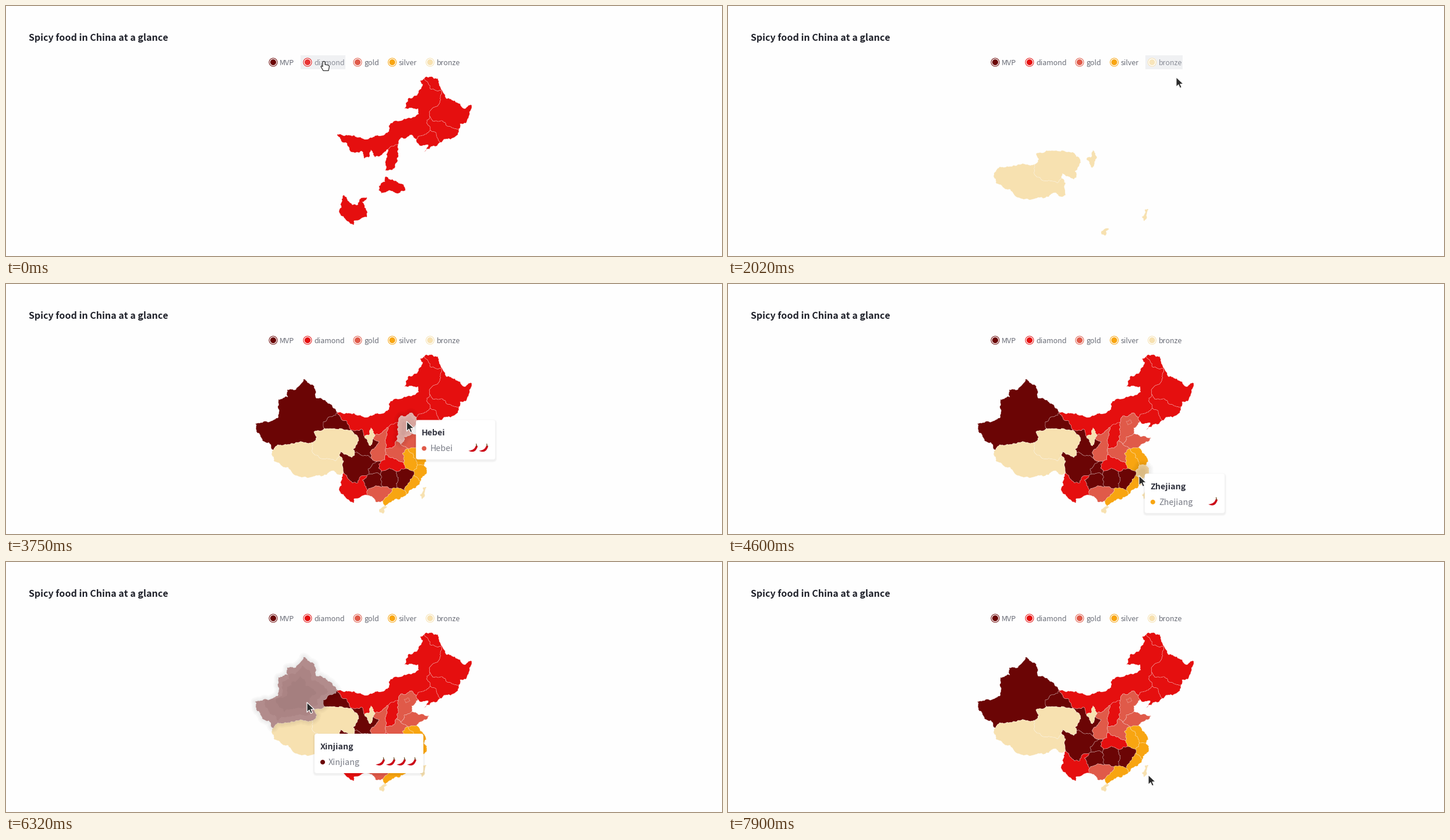
Animation, 1230 px wide and 431 px high, one loop 8000 ms. Source, as a matplotlib script:

```python
import math
import random

import matplotlib.pyplot as plt
import numpy as np
from matplotlib.animation import FuncAnimation
from matplotlib.colors import to_rgb
from matplotlib.patches import Circle, FancyBboxPatch, PathPatch, Polygon, Rectangle
from matplotlib.path import Path
from matplotlib.transforms import Affine2D

W, H, DPI = 1230, 431, 64
LOOP, TICK = 8000, 50
PT = 72 / DPI  # points per pixel
FONT = "Noto Sans CJK JP"
INK, GRAY = "#20222b", "#6c6f79"

TIERS = {"MVP": "#6b0505", "diamond": "#e50f0f", "gold": "#e05a49",
         "silver": "#f8a511", "bronze": "#f7e1b0"}
PEPPERS = dict(zip(TIERS, (4, 3, 2, 1, 0)))

fig = plt.figure(figsize=(W / DPI, H / DPI), dpi=DPI, facecolor="#fefefe")
ax = fig.add_axes([0, 0, 1, 1])
ax.set_xlim(0, W)
ax.set_ylim(H, 0)
ax.axis("off")


def label(x, y, s, px, color, weight="normal", **kw):
    return ax.text(x, y, s, fontsize=px * PT, color=color, family=FONT,
                   weight=weight, va="baseline", **kw)


def text_width(t):
    return t.get_window_extent().width


# ---- map: corners where borders meet, bends between them, rings ----------
CORNER = dict(
    a=(569, 221), b=(547, 249), c=(526, 273), d=(459, 286), e=(573, 296),
    f=(580, 326), h=(599, 290), i=(627, 300), j=(631, 265), k=(616, 263),
    l=(634, 261), m=(656, 247), n=(674, 238), o=(705, 230), p=(729, 214),
    q=(728, 190), r=(718, 125), s=(778, 212), t=(746, 235), u=(708, 237),
    v=(697, 258), w=(678, 276), x=(671, 270), y=(652, 284), z=(691, 284),
    A=(705, 282), B=(707, 312), C=(718, 312), D=(700, 322), E=(686, 318),
    F=(683, 308), G=(652, 294), H=(645, 305), I=(638, 306), J=(645, 323),
    K=(671, 323), L=(645, 331), M=(624, 328), N=(620, 330), O=(621, 356),
    P=(647, 349), Q=(663, 353), R=(672, 351), S=(685, 356), T=(701, 329),
    U=(712, 340), V=(688, 363), X=(647, 374), Y=(620, 364))

bends = {}


def pairs(xy):
    return list(zip(xy[::2], xy[1::2]))


def bend(ends, *xy):
    bends[ends] = pairs(xy)
    bends[ends[::-1]] = pairs(xy)[::-1]


# outer edge
bend("da", 455, 277, 446, 273, 430, 254, 428, 241, 467, 231, 468, 199, 484, 195,
     483, 182, 498, 182, 511, 164, 530, 180, 533, 197, 557, 207)
bend("ra", 711, 129, 716, 135, 706, 154, 691, 159, 684, 177, 708, 177, 709, 186,
     681, 197, 661, 202, 658, 213, 650, 222, 619, 230, 598, 223)
bend("sr", 780, 203, 790, 202, 800, 171, 787, 177, 771, 163, 757, 160, 742, 125, 729, 122)
bend("ts", 756, 229, 764, 230, 778, 217)
bend("tu", 738, 242, 718, 252, 725, 239, 711, 241)
bend("uv", 697, 248)
bend("vA", 708, 263, 727, 265, 709, 277)
bend("AC", 714, 292, 722, 306)
bend("CU", 723, 325)
bend("UV", 706, 348)
bend("VX", 668, 371, 651, 384)
bend("XY", 638, 376, 628, 366)
bend("Yf", 598, 370, 598, 377, 585, 370, 573, 357, 577, 337)
bend("fd", 573, 329, 560, 322, 534, 330, 520, 334, 497, 330, 479, 316, 461, 306, 457, 291)
# inner borders
bend("ab", 552, 232, 545, 238)
bend("bc", 529, 255, 534, 264)
bend("cd", 500, 273, 467, 277)
bend("ce", 527, 291, 566, 305)
bend("ef", 580, 306)
bend("eh", 574, 289, 594, 299)
bend("bh", 566, 250, 588, 252, 606, 270, 596, 285)
bend("hi", 610, 295)
bend("ij", 628, 286, 641, 272)
bend("jk", 626, 279, 620, 268)
bend("kl", 623, 261, 627, 248)
bend("ka", 611, 250, 595, 252, 586, 237, 576, 233)
bend("lm", 642, 259)
bend("no", 676, 230, 697, 222)
bend("op", 722, 221)
bend("pq", 723, 197)
bend("qr", 727, 183, 743, 170, 747, 145, 729, 143)
bend("qs", 736, 199, 747, 198, 766, 210)
bend("pt", 739, 219)
bend("vw", 684, 264)
bend("nx", 674, 254)
bend("xy", 667, 280)
bend("ym", 653, 265)
bend("GH", 651, 303)
bend("zF", 681, 292)
bend("FG", 657, 298)
bend("zB", 704, 303)
bend("TS", 690, 346)
bend("KR", 674, 338)
bend("KJ", 660, 318)
bend("JH", 640, 317)
bend("LM", 634, 326)
bend("MI", 622, 319)
bend("PO", 632, 350)
bend("ON", 612, 338)
bend("Nf", 610, 331, 604, 343, 595, 343)
bend("QX", 656, 366)

RINGS = {
    "MVP": {"Xinjiang": "abcd", "Gansu": "abhijk", "Sichuan": "ehiIMNf", "Guizhou": "LPONM",
            "Chongqing": "HJLMI", "Hunan": "JKRQPL", "Jiangxi": "KEDTSR"},
    "diamond": {"Inner Mongolia": "aklmnopqr", "Heilongjiang": "rqs", "Jilin": "qpts",
                "Liaoning": "optu", "Shanxi": "mnxy", "Hubei": "GFEKJH", "Yunnan": "fNOY"},
    "gold": {"Hebei": "nouvwx", "Shaanxi": "lmyGHIij", "Shandong": "wvAz",
             "Henan": "xwzFGy", "Guangxi": "OPQXY"},
    "silver": {"Jiangsu": "zACB", "Anhui": "zBDEF", "Zhejiang": "BCUTD",
               "Fujian": "TUVS", "Guangdong": "QRSVX"},
    "bronze": {"Tibet": "dcef", "Qinghai": "bceh", "Ningxia": "klj"}}


def split(a, b, rng):
    """Points after a up to b, bent by midpoint displacement."""
    dx, dy = b[0] - a[0], b[1] - a[1]
    size = math.hypot(dx, dy)
    if size < 3:
        return [b]
    k = rng.uniform(-1, 1) * (0.1 if size > 14 else 0.22)
    m = ((a[0] + b[0]) / 2 - k * dy, (a[1] + b[1]) / 2 + k * dx)
    return split(a, m, rng) + split(m, b, rng)


def rough(pts):
    """Jagged outline; an edge gets the same bends in both its neighbours."""
    out = []
    for a, b in zip(pts, pts[1:] + pts[:1]):
        lo, hi = min(a, b), max(a, b)
        line = [lo] + split(lo, hi, random.Random(f"{lo}{hi}"))
        out += (line if a == lo else line[::-1])[:-1]
    return np.array(out)


regions = {}


def region(name, tier, pts):
    shape = rough(pts)
    patch = Polygon(shape, lw=0.7 * PT, joinstyle="round", zorder=2)
    ax.add_patch(patch)
    regions[name] = (tier, shape, patch)


for tier, rings in RINGS.items():
    for name, ring in rings.items():
        pts = []
        for g, g2 in zip(ring, ring[1:] + ring[0]):
            pts += [CORNER[g]] + bends.get(g + g2, [])
        region(name, tier, pts)
region("Beijing", "gold", pairs((684, 237, 690, 234, 694, 239, 687, 243)))
region("Hainan", "bronze", pairs((641, 389, 646, 385, 655, 385, 648, 396, 642, 394)))
region("Taiwan", "bronze", pairs((716, 351, 722, 350, 719, 362, 715, 371, 711, 363)))

# ---- highlight: halo, blank base, darker core, pale fill -----------------
SPOT = np.zeros((3, 2))


def layer(z, **kw):
    return ax.add_patch(Polygon(SPOT, zorder=z, joinstyle="round", **kw))


halo = [layer(3, fill=False, ec=(0, 0, 0, 0.025), lw=w * PT) for w in (5, 10, 15)]
base = layer(3.1, fc="#fefefe", lw=0)
cores = [(s, layer(3.2, fc=(0, 0, 0, a), lw=0))
         for s, a in ((1, 0.12), (0.78, 0.05), (0.5, 0.04))]
tint = layer(3.3, lw=0.5 * PT)
glow = halo + [base, tint] + [p for _, p in cores]


def highlight(name):
    for p in glow:
        p.set_visible(name is not None)
    if name is None:
        return
    tier, shape, _ = regions[name]
    mid = shape.mean(axis=0)
    for p in halo + [base, tint]:
        p.set_xy(shape)
    for s, p in cores:
        p.set_xy(mid + s * (shape - mid))
    tint.set_facecolor((*to_rgb(TIERS[tier]), 0.38))
    tint.set_edgecolor((1, 1, 1, 0.2))


# ---- title and legend ----------------------------------------------------
label(39, 60, "Spicy food in China at a glance", 16, INK, "bold")
legend = {}
for (tier, color), cx in zip(TIERS.items(), (459, 518, 604, 663.5, 728.5)):
    text = label(cx + 11, 102, tier, 12.5, GRAY, zorder=2)
    back = Rectangle((cx - 12, 85), text_width(text) + 24, 24, fc="#f0f1f3", zorder=1)
    ring = Circle((cx, 97), 7, fc="white", ec=color, lw=PT, zorder=2)
    dot = Circle((cx, 97), 5.1, fc=color, lw=0, zorder=3)
    for p in (back, ring, dot):
        ax.add_patch(p)
    legend[tier] = (text, back, dot)

# ---- tooltip -------------------------------------------------------------
place, shift = Affine2D(), Affine2D()
at = place + ax.transData


def card(pad, dy, z, **kw):
    return ax.add_patch(FancyBboxPatch(
        (0, dy), 100, 68, boxstyle=f"round,pad={pad},rounding_size={4 + pad}",
        transform=at, lw=0, zorder=z, **kw))


cards = [card(3, 2, 5, fc=(0, 0, 0, 0.025)), card(1.5, 2, 5, fc=(0, 0, 0, 0.03)),
         card(0, 0, 5.1, fc="white")]
head = label(10, 27, "", 14.3, "#31333f", "bold", transform=at, zorder=6)
row = label(24, 54, "", 14.3, "#7a7d87", transform=at, zorder=6)
bullet = ax.add_patch(Circle((14, 49), 4, lw=0, transform=at, zorder=6))
POD = Path([(0, 53), (12, 59), (16, 45), (12.5, 44), (11, 52), (0, 53)],
           [Path.MOVETO, Path.CURVE3, Path.CURVE3, Path.LINETO, Path.CURVE3, Path.CURVE3])
pods = []
for k in range(4):
    tr = Affine2D().translate(18 * k, 0) + shift + at
    pod = ax.add_patch(PathPatch(POD, fc="#cc0a18", lw=0, transform=tr, zorder=6))
    stem, = ax.plot([14.2, 13.4], [45, 41.5], color="#6b4a1e", lw=1.3 * PT,
                    transform=tr, zorder=6)
    pods.append((pod, stem))


def tooltip(name, x, y):
    shown = name is not None
    for p in cards + [head, row, bullet]:
        p.set_visible(shown)
    tier = regions[name][0] if shown else "bronze"
    n = PEPPERS[tier]
    for k, pair in enumerate(pods):
        for p in pair:
            p.set_visible(k < n)
    if not shown:
        return
    head.set_text(name)
    row.set_text(name)
    bullet.set_facecolor(TIERS[tier])
    start = 24 + text_width(row) + 27
    for c in cards:
        c.set_width(start + 18 * n + 10)
    shift.clear().translate(start, 0)
    place.clear().translate(x, y)


# ---- pointer -------------------------------------------------------------
ARROW = pairs((0, 0, 0, 17, 4, 13.2, 6.5, 19, 9.5, 17.8, 7, 12, 12.5, 12))
HAND = pairs((-1, 0.5, 1, 0.5, 2, 2, 2, 6, 8, 7, 9.5, 9, 8, 16.5, -1, 16.5,
              -5, 9.5, -4, 8, -2, 9.5, -2, 2))
spot = Affine2D()


def pointer(pts, fc, ec):
    return ax.add_patch(Polygon(pts, fc=fc, ec=ec, lw=1.2 * PT, joinstyle="round",
                                transform=spot + ax.transData, zorder=9))


arrow, hand = pointer(ARROW, "#2b2b2b", "white"), pointer(HAND, "white", "#2b2b2b")

# ---- timing --------------------------------------------------------------
STEPS = np.concatenate([[0]] + [np.linspace(*s) for s in (
    (150, 1180, 8), (1330, 1600, 3), (1870, 2870, 8), (3020, 4020, 8),
    (4170, 5170, 8), (5320, 6320, 8), (6470, 7320, 7), (7590, 7900, 3))])
FOCUS = [(-1000, "diamond"), (450, "gold"), (880, "silver"), (1330, "bronze"), (2100, None)]
MOVES = [(0, 546, 95, None), (150, 546, 95, None), (900, 680, 97, None),
         (1470, 760, 97, None), (2010, 770, 122, None),
         (2150, 766, 150, "Heilongjiang"), (2860, 744, 190, "Heilongjiang"),
         (3020, 727, 213, "Jilin"), (3300, 712, 208, "Inner Mongolia"),
         (3730, 688, 236, "Hebei"), (3880, 700, 265, "Shandong"),
         (4170, 706, 296, "Jiangsu"), (4450, 709, 322, "Zhejiang"),
         (4590, 707, 330, "Zhejiang"), (4740, 690, 336, "Jiangxi"),
         (4880, 660, 337, "Hunan"), (5160, 632, 340, "Guizhou"),
         (5320, 612, 322, "Sichuan"), (5600, 599, 310, "Sichuan"),
         (5890, 570, 285, "Qinghai"), (6170, 530, 250, "Xinjiang"),
         (6320, 517, 242, "Xinjiang"), (6600, 566, 272, "Qinghai"),
         (6750, 604, 310, "Sichuan"), (6890, 632, 340, "Guizhou"),
         (7030, 672, 364, "Guangdong"), (7170, 715, 362, "Taiwan"),
         (7310, 761, 368, None), (7900, 722, 367, None)]
# the tooltip trails the pointer by a drifting offset
TRAIL = [(2150, 0, 12), (3020, 20, -1), (4590, 11, -4), (4740, -10, 5),
         (5600, 37, 28), (6320, 13, 54), (6750, -4, 22), (7170, -25, -12)]


def along(keys, t):
    ts, xs, ys = zip(*(k[:3] for k in keys))
    return np.array([np.interp(t, ts, xs), np.interp(t, ts, ys)])


def last(keys, t):
    return max(i for i, k in enumerate(keys) if k[0] <= t)


def draw(i):
    t = STEPS[STEPS <= i * TICK + 30].max()

    f = last(FOCUS, t)
    start, focus = FOCUS[f]
    before = FOCUS[f - 1][1] if f else focus
    mix = min(1, (t - start + 100) / 300)
    shown = {tier: mix * (focus in (tier, None)) + (1 - mix) * (before in (tier, None))
             for tier in TIERS}
    for tier, _, patch in regions.values():
        patch.set_facecolor((*to_rgb(TIERS[tier]), shown[tier]))
        patch.set_edgecolor((1, 1, 1, 0.35 * shown[tier]))
    for tier, (text, back, dot) in legend.items():
        back.set_visible(tier == focus)
        text.set_color("#8b8e98" if tier == focus else GRAY)
        dot.set_alpha(0.85 if tier == focus else 1)

    tip = along(MOVES, t)
    name = MOVES[last(MOVES, t)][3]
    highlight(name)
    tooltip(name, *(tip + along(TRAIL, t)))

    spot.clear().translate(*tip)
    hand.set_visible(t < 2000)
    arrow.set_visible(t >= 2000)
    return []


anim = FuncAnimation(fig, draw, frames=LOOP // TICK, interval=TICK,
                     repeat=True, repeat_delay=0, blit=False)
plt.show()
```
